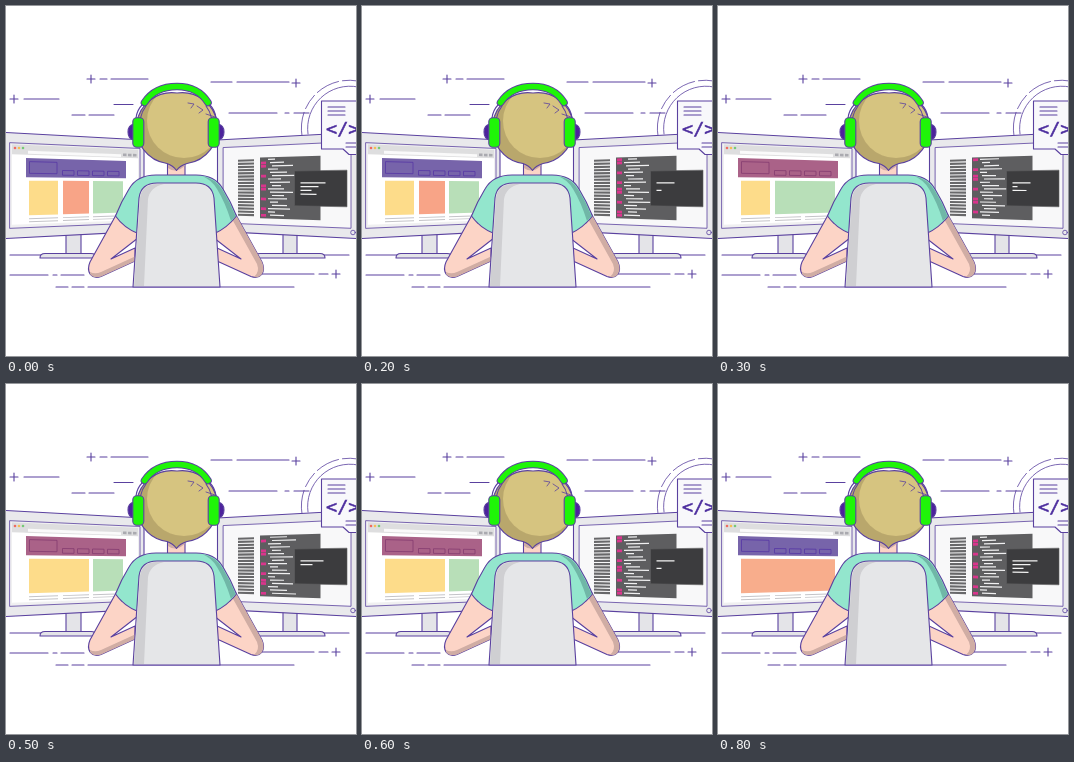
Recreate the animation shown at these times as an HTML page. Size 350 by 350 pixels, loop 900 ms.

```html
<!DOCTYPE html>
<html lang="en">
<head>
<meta charset="utf-8">
<title>Programmer at work</title>
<style>
  html, body { margin: 0; width: 100%; height: 100%; overflow: hidden; background: #fff; }
  svg { display: block; width: 100%; height: 100%; }
  .ink { stroke: #5a419f; stroke-width: 1.1; stroke-linejoin: round; stroke-linecap: round; }
  .line { fill: none; }
  .thin { stroke-width: .8; }
</style>
</head>
<body>
<svg viewBox="0 0 350 350">
  <defs>
    <path id="hair" d="M171 87A35 35 0 0 1 181 157.500Q174 159.500 170.500 164.500Q167 159.500 161 157.500A35.500 35.500 0 0 1 171 87z"/>
    <clipPath id="hairClip"><use href="#hair"/></clipPath>
    <path id="plus" d="M-4 0H4M0-4V4"/>
    <path id="band" d="M138.500 96.500Q149 80.500 171 80.500Q192 80.500 202 96.500"/>
  </defs>

  <!-- background strokes -->
  <g class="ink line">
    <path d="M94 73H101M105 73H142M18 93H53M108 98.500H127M66 109H79M83 109H108
             M205 76H226M231 76H283M223 107H271M279 107H283M288 107H303
             M4 269H42M47 269H51M55 269H78M256 268H308M313 268H322
             M50 281H62M66 281H78M82 281H288M4 249H107M240 249H343"/>
    <use href="#plus" x="85" y="73"/><use href="#plus" x="8" y="93"/>
    <use href="#plus" x="290" y="77"/><use href="#plus" x="330" y="268"/>
    <path class="thin" stroke-dasharray="24 4 16 4" d="M296 130A48 48 0 0 1 352 75"/>
    <path class="thin" d="M302 128A42 42 0 0 1 352 81"/>
  </g>

  <!-- stands, monitors and their screens -->
  <g class="ink" fill="#e4e4e8">
    <path d="M60 226H75V248H60zM277 226H291V248H277z"/>
    <path d="M34 252Q34 247.500 39 247.500H85Q90 247.500 90 252zM249 252Q249 247.500 254 247.500H314Q319 247.500 319 252z"/>
  </g>
  <g id="monitors"></g>
  <circle class="ink thin line" cx="347" cy="226.500" r="2.300"/>
  <g id="page"></g>
  <g id="code"></g>
  <g id="terminal"></g>

  <!-- document -->
  <path class="ink" fill="#f8f8fb" d="M315.500 95H352V148.500H343L337 143H315.500z"/>
  <path class="ink line" d="M322 101H339M322 105H339M322 109H339M340 137H350M340 141H350"/>
  <text x="320" y="128.500" font-family="'DejaVu Sans Mono', monospace" font-size="18.500" fill="#4c2d9e" stroke="#4c2d9e" stroke-width=".5">&lt;/&gt;</text>

  <!-- arms -->
  <g id="arm">
    <path class="ink" fill="#fcd4c6" d="M110 209L84 256Q81 263 84 268Q88 273 95 270.500L129 255V242L105 253L132 232V215z"/>
  </g>
  <use href="#arm" transform="matrix(-1 0 0 1 340 0)"/>
  <path fill="#d0ada4" d="M84 268Q88 273 95 270.500L129 255V250.500L95 266Q89 268.500 84 266zM230 209L256 256Q259 263 256 268Q253 272 248 271Q254 266 251 258L226 213z"/>

  <!-- shirt -->
  <path class="ink" fill="#fcd4c6" d="M161.500 157H179V172H161.500z"/>
  <path fill="#d0ada4" d="M162 158H178.500V160Q170 168 162 162z"/>
  <use href="#hair" fill="#b9a76c"/>
  <path class="ink" fill="#93e6cd" d="M150 169H190Q209 169 217 183Q225 196 230.500 210Q221 222 208.500 227.500H132Q118 222 109.500 210Q115 196 123 183Q131 169 150 169z"/>
  <path fill="#70b7a7" d="M196 170Q209 172 216.500 184Q224 196 229.500 210L225 215Q219 196 211 183Q206 174 196 170z"/>

  <!-- chair -->
  <path class="ink" fill="#e5e6e8" d="M127 281L133 192Q135 177 151 177H190Q206 177 208 192L214 281z"/>
  <path fill="#cfcfd2" d="M128 280L134 192Q136 178 151 178H158Q144 181 142 193L138 280z"/>

  <!-- head -->
  <circle clip-path="url(#hairClip)" cx="178" cy="115" r="37" fill="#d6c480"/>
  <use href="#hair" class="ink line"/>
  <path class="ink line thin" d="M182 97L188 98L185 102M191 100L197 104L193 107M200 108L209 111"/>

  <!-- headphones -->
  <g class="line" stroke-linecap="round">
    <use href="#band" stroke="#5a419f" stroke-width="7.600"/>
    <use href="#band" stroke="#1ff508" stroke-width="5.600"/>
  </g>
  <g id="cup" class="ink">
    <path class="line" d="M130 112Q131 104 136 99M134.500 112Q136 105 140 100"/>
    <path fill="#4d239c" d="M128 118Q122 119 122 126Q122 133 128 134z"/>
    <rect x="126.800" y="111.800" width="11" height="29.500" rx="4" fill="#1ff508"/>
  </g>
  <use href="#cup" transform="matrix(-1 0 0 1 340 0)"/>
</svg>
<script>
const STEP = 100, STEPS = 9, WIDTH = 350, HORIZON = 181, DEPTH = .001;
const YELLOW = "#fddc8a", RED = "#f8a487", GREEN = "#b8dfb8", ORANGE = "#f8ad8c";
const PURPLE = "#7764aa", PINK = "#aa6288";
const [monitors, page, code, terminal] =
  ["monitors", "page", "code", "terminal"].map(id => document.getElementById(id));

// A box on a monitor: heights shrink towards the middle of the stage.
function box(x, y, w, h, fill, extra = "") {
  const point = (px, py) => {
    const depth = Math.min(px, WIDTH - px) * DEPTH;
    return `${px},${(py + (HORIZON - py) * depth).toFixed(2)}`;
  };
  const corners = [point(x, y), point(x + w, y), point(x + w, y + h), point(x, y + h)];
  return `<polygon points="${corners.join(" ")}" fill="${fill}" ${extra}/>`;
}

// Each card is [left, right, colour].
const layouts = [
  { until: 3, header: PURPLE, cards: [[23, 52, YELLOW], [57, 83, RED], [87, 117, GREEN]] },
  { until: 5, header: PINK, cards: [[23, 52, YELLOW], [57, 117, GREEN]] },
  { until: 7, header: PINK, cards: [[23, 83, YELLOW], [87, 117, GREEN]] },
  { until: 9, header: PURPLE, cards: [[23, 117, ORANGE]] }
];

const typed = [[25, 18, 11, 16], [23, 12, 0, 0], [18, 0, 5, 0], [18, 5, 14, 0]];

function drawMonitors() {
  const ink = 'class="ink"', thin = 'class="ink thin"';
  monitors.innerHTML =
    box(-2, 126.5, 140, 106, "#e9e9ec", ink) + box(4, 136.5, 130, 86, "#f0f0f1", thin) +
    box(211.5, 126.5, 141, 106, "#e9e9ec", ink) + box(217.5, 135.5, 127.5, 87, "#f8f8f9", thin) +
    box(6, 138, 126, 81, "#fff") + box(6, 138, 126, 10, "#dededf") + box(22, 144, 93, 3, "#fafafa") +
    [117, 122, 127].map(x => box(x, 143, 3.5, 3, "#aaaab0")).join("") +
    ["#ef6b61", "#f5bd55", "#77c978"].map((fill, i) =>
      `<circle cx="${9 + i * 4}" cy="142" r="1.3" fill="${fill}"/>`).join("");
}

function drawPage(step) {
  const { header, cards } = layouts.find(layout => step < layout.until);
  const outline = `stroke="${header === PURPLE ? "#5637a5" : "#843b70"}" stroke-width=".8"`;
  let out = box(20, 151.5, 100, 19.5, header) + box(23.5, 155, 27.5, 12, "none", outline);
  for (let i = 0; i < 4; i++) out += box(56.5 + i * 15, 163.5, 11.5, 5, "none", outline);
  for (const [left, right, fill] of cards) out += box(left, 174.5, right - left, 35.5, fill);
  for (const [left, right] of layouts[0].cards)
    out += box(left, 213, right - left, 1, "#c4c4c8") + box(left, 216, right - left, 1, "#c4c4c8");
  page.innerHTML = out;
}

function drawCode(phase) {
  let out = box(254, 148.5, 60.5, 67, "#5e5e60");
  for (let row = 0; row < 18; row++) {
    const y = 150 + row * 3.6, id = (row + phase * 4) % 16;
    const pink = [1, 2, 5, 8, 9, 12, 15].includes(id);
    out += box(232, y, 16, 2.4, "#68686a");
    if (pink) out += box(255, y - .5, 5, 3, "#d9358c");
    out += box(262 + (id % 3) * 2, y, 7 + (id * 7) % 18, 1.3, "#f0f0f1");
  }
  code.innerHTML = out;
}

function drawTerminal(phase) {
  terminal.innerHTML = box(288.5, 164, 52.5, 37, "#3c3c3e", 'stroke="#5e5e60" stroke-width=".6"') +
    typed[phase].map((w, i) => box(294.5, 176 + i * 4, w, 1.3, "#f4f4f4")).join("");
}

let shown = -1;
function draw(now) {
  const step = Math.floor(now / STEP) % STEPS;
  if (step !== shown) {
    shown = step;
    drawPage(step);
    drawCode(step % 4);
    drawTerminal(step % 4);
  }
  requestAnimationFrame(draw);
}
drawMonitors();
draw(0);
</script>
</body>
</html>
```
